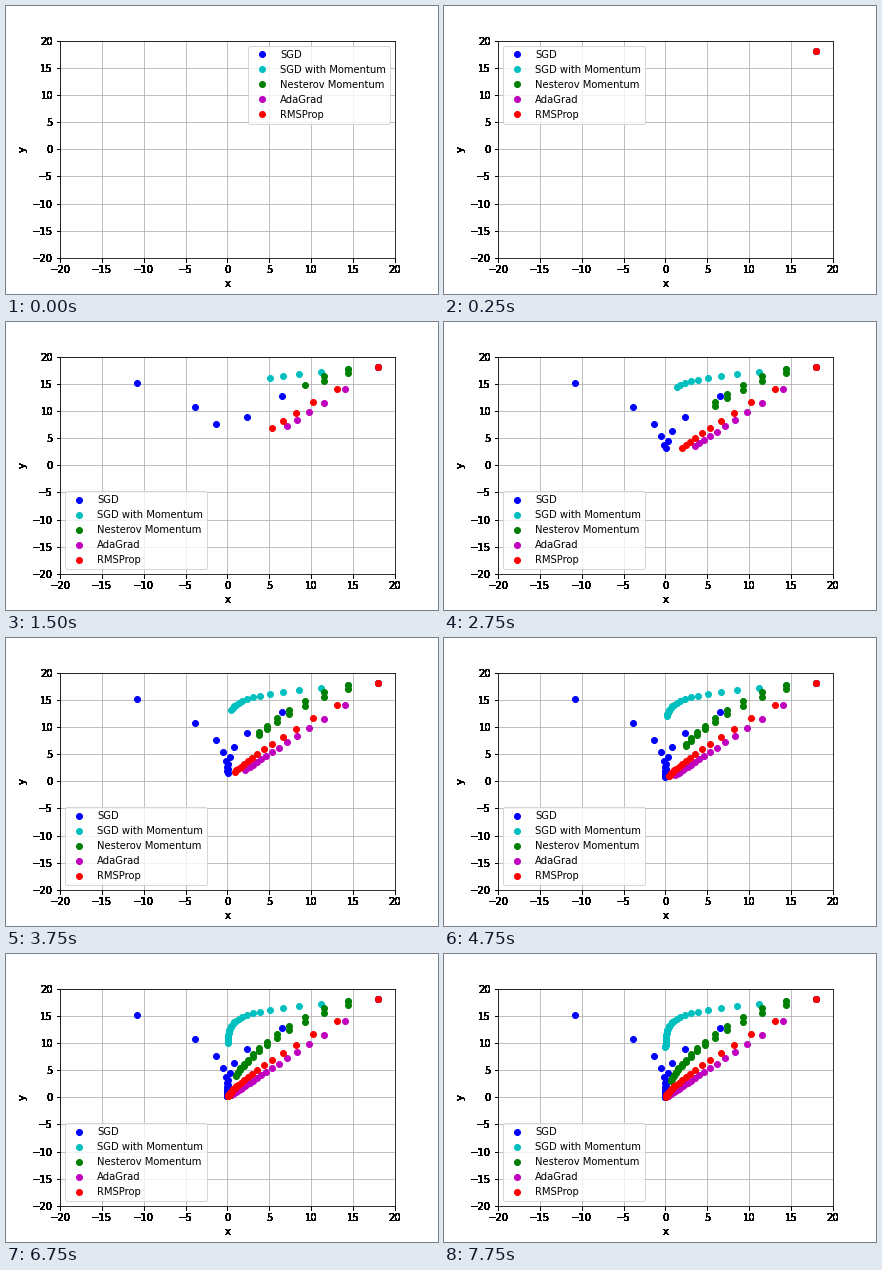
Animation of 432 by 288 pixels, one loop 8 s. Source, as a matplotlib script:

```python
import matplotlib.pyplot as plt
import numpy as np
from matplotlib.animation import FuncAnimation

STEPS = 32
START = np.array([18.0, 18.0])
LIMIT = 20


def grad(p):
    """Gradient of x**2 + 0.1 * y**2."""
    return np.array([2.0, 0.2]) * p


# Each rule takes position and memory, and returns both after one step.
def sgd(p, m, lr=0.8):
    return p - lr * grad(p), m


def momentum(p, v, lr=0.1, beta=0.1):
    v = beta * v + lr * grad(p)
    return p - v, v


def nesterov(p, v, lr=0.1, beta=0.8):
    v = beta * v + grad(p - beta * v)
    return p - lr * v, v


def adagrad(p, h, lr=4.0):
    g = grad(p)
    h = h + g ** 2
    return p - lr * g / (np.sqrt(h) + 1e-8), h


def rmsprop(p, h, lr=0.5, rho=0.99, eps=0.1):
    g = grad(p)
    h = rho * h + (1 - rho) * g ** 2
    return p - lr * g / (np.sqrt(h) + eps), h


def descend(rule):
    p, memory = START, np.zeros(2)
    path = [p]
    for _ in range(STEPS - 1):
        p, memory = rule(p, memory)
        path.append(p)
    return np.array(path)


def thicken(artist, passes=14):
    """Draw an artist repeatedly so its soft edges turn solid."""
    draw = artist.draw
    artist.draw = lambda renderer: [draw(renderer) for _ in range(passes)]


METHODS = [
    ("SGD", "b", sgd),
    ("SGD with Momentum", "c", momentum),
    ("Nesterov Momentum", "g", nesterov),
    ("AdaGrad", "m", adagrad),
    ("RMSProp", "r", rmsprop),
]

plt.rcParams["font.family"] = "DejaVu Sans"
fig, ax = plt.subplots(figsize=(6, 4), dpi=72, facecolor="white")
fig.subplots_adjust(left=0.125, right=0.9, bottom=0.125, top=0.88)

ticks = np.arange(-LIMIT, LIMIT + 1, 5)
ax.set(xlim=(-LIMIT, LIMIT), ylim=(-LIMIT, LIMIT),
       xticks=ticks, yticks=ticks, xlabel="x", ylabel="y")
ax.grid(True)

for axis in (ax.xaxis, ax.yaxis):
    thicken(axis.label)
    for tick in axis.get_major_ticks():
        thicken(tick.label1)
        thicken(tick.tick1line)

paths = [descend(rule) for _, _, rule in METHODS]
dots = [ax.plot([], [], "o", color=color, label=name)[0]
        for name, color, _ in METHODS]
ax.legend(loc="best")


def update(i):
    for dot, path in zip(dots, paths):
        dot.set_data(path[:i, 0], path[:i, 1])
    return dots


anim = FuncAnimation(fig, update, frames=STEPS, interval=250,
                     init_func=lambda: update(0), repeat=True, repeat_delay=0)
plt.show()
```
